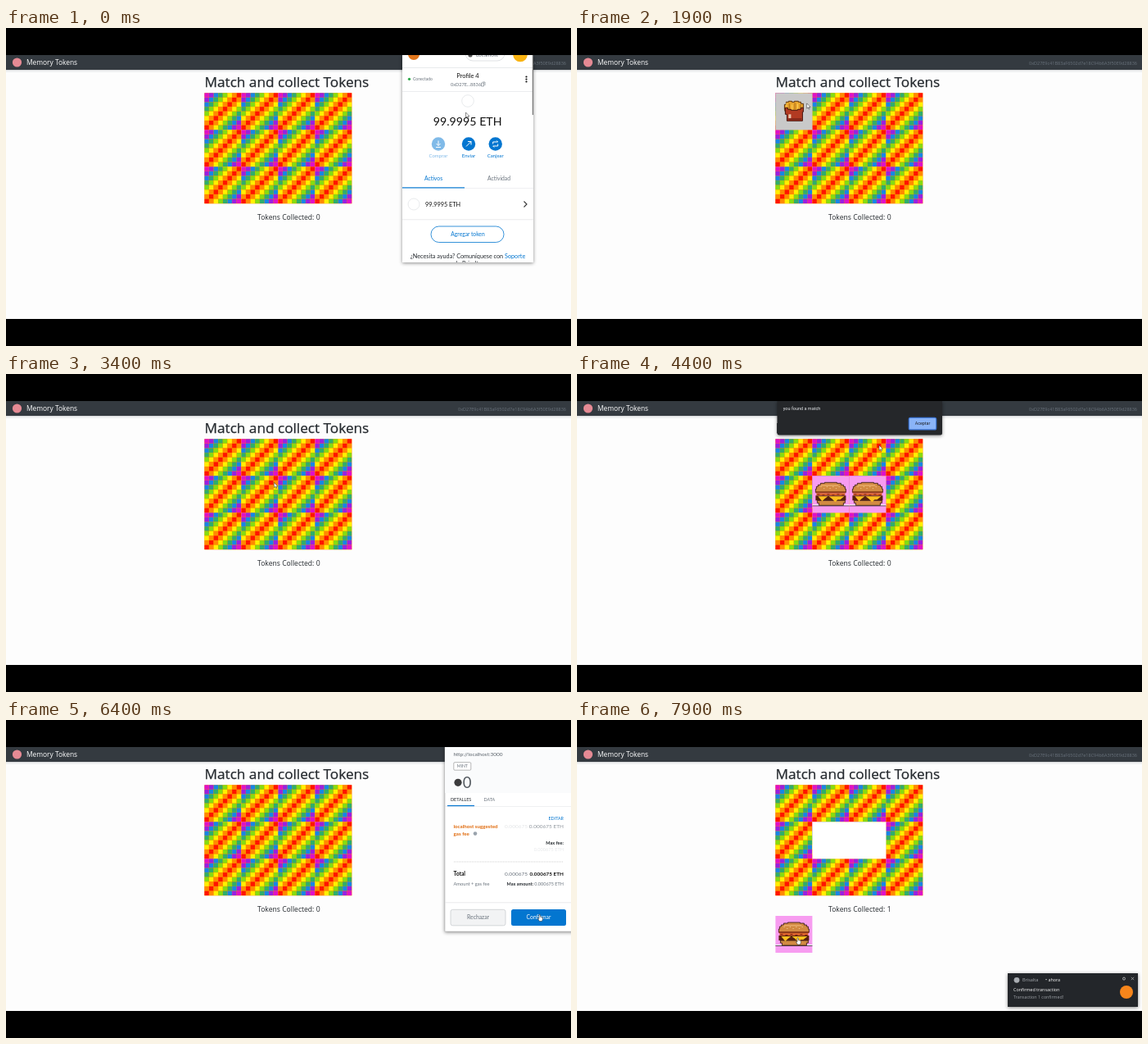
Animation of 690 by 388 pixels, one loop 8 s. Source, as an HTML page:

```html
<!DOCTYPE html>
<html lang="en">
<head>
<meta charset="utf-8">
<title>Memory Tokens</title>
<style>
html, body { margin: 0; width: 100%; height: 100%; overflow: hidden; background: #000; }
svg { display: block; }
#stage { width: 100vw; height: 100vh; }
text { font-family: "Open Sans", "Noto Sans", sans-serif; white-space: pre; }
.wallet text { font-family: Lato, "Open Sans", sans-serif; }
.dark text { font-family: Roboto, "Open Sans", sans-serif; }
.shadow { filter: drop-shadow(0 1px 2px rgba(0, 0, 0, .45)); }
</style>
</head>
<body>
<svg id="stage" viewBox="0 0 690 388"></svg>
<script>
const LOOP = 8000, STEP = 100;
const BLUE = '#0376d0', INK = '#24292e', GREY = '#6a737d', PALE = '#dfe1e4', ORANGE = '#f6851b';
const SIZE = 45, LEFT = 242.4, TOP = 79.3;

const text = (x, y, size, fill, str, { w = 400, a = 'start' } = {}) =>
  `<text x="${x}" y="${y}" font-size="${size}" fill="${fill}" font-weight="${w}" text-anchor="${a}">${str}</text>`;
const rect = (x, y, w, h, fill, more = '') =>
  `<rect x="${x}" y="${y}" width="${w}" height="${h}" fill="${fill}" ${more}/>`;
const circle = (x, y, r, fill, more = '') => `<circle cx="${x}" cy="${y}" r="${r}" fill="${fill}" ${more}/>`;
const path = (d, fill, stroke = 'none', width = 1, more = '') =>
  `<path d="${d}" fill="${fill}" stroke="${stroke}" stroke-width="${width}" ${more}/>`;
const group = (id, body, cls = '') => `<g id="${id}" class="${cls}">${body}</g>`;
const mid = { a: 'middle' }, end = { a: 'end' }, bold = { w: 700 }, endBold = { a: 'end', w: 700 };

// Card back: diagonal bands, mirrored about the red centre line
const bands = ['#e010c8', '#9a20e0', '#1686e6', '#2fae6a', '#86dc10', '#fff000', '#ff8a00', '#ff1400'];
function cardBack() {
  const cell = SIZE / 8;
  let out = rect(0, 0, SIZE, SIZE, '#f80');
  for (let i = 0; i < 64; i++) {
    const x = i % 8, y = i >> 3;
    out += rect(x * cell, y * cell, cell - .25, cell - .25, bands[7 - Math.abs(7 - x - y)]);
  }
  return out;
}

function fries() {
  let out = rect(0, 0, SIZE, SIZE, '#c9c9c9') +
    path('M11 20V14h2v-3h3v-1h4v1h3v-1h5v1h3v2h3v6h-2v4H12z', '#e9a52b', '#5a3212');
  for (let i = 0; i < 6; i++) out += rect(13 + i * 3.4, 12 + i % 3, 1, 8, i % 2 ? '#a9691b' : '#ffd35a');
  return out + path('M12 18h3v2h4v1h8v-1h4v-2h3v5h-1v11H14v-8h-2z', '#b23a22', '#45160f') +
    rect(16, 26, 3, 5, '#e8c9b0') + rect(15, 31, 17, 2, '#7c2418');
}

function popsicle() {
  return rect(0, 0, SIZE, SIZE, '#62f2ec') +
    path('M20 30h5v6h-1v1h-3v-1h-1z', '#c97a3a', '#2a1a18') +
    path('M15 30V13h1v-2h2v-2h9v2h2v2h1v17h-2v1H17v-1z', '#b9ecfb', '#101820', 1.2) +
    rect(18, 12, 2, 10, '#fff') + rect(26, 14, 2, 14, '#84cde8');
}

function burger() {
  let out = rect(0, 0, SIZE, SIZE, '#f79cf0') + rect(0, 35, SIZE, 1.5, '#fff') +
    rect(0, 36.2, SIZE, .8, '#3a2a3a') +
    path('M6 30h34v3h-2v3H8v-3H6z', '#d28a42', '#2a1410', .8) +
    path('M4 20V16h1v-3h2v-2h3V9h5V8h15v1h5v2h3v2h2v3h1v4z', '#d28a42', '#2a1410', .8) +
    rect(10, 11, 22, 1.5, '#e8ac68') +
    rect(4, 19, 37, 2, '#8e3c1c') + rect(5, 21, 35, 3, '#d9622c') + rect(4, 24, 37, 6, '#55210f');
  for (let i = 0; i < 7; i++) out += rect(10 + i * 3.7, 13 + i * 2 % 4, 1.2, .8, '#f6d9a0');
  for (let i = 0; i < 6; i++) out += rect(6 + i * 6, 22 + i % 2, 3, 1, '#7b2114');
  return out + path('M7 25h12l-4 3 -3 3zM20 25h19l-5 4h-3l-3 3 -4-4z', '#fcbf1e');
}

const faces = { back: cardBack, fries, popsicle, burger };
const at = (face, col, row) => `<use href="#${face}" x="${LEFT + col * SIZE}" y="${TOP + row * SIZE}"/>`;

function page() {
  let out = rect(0, 33, 690, 322, '#fdfdfd') + rect(0, 51, 690, 1, '#d6d8da') + rect(0, 52, 690, 2, '#f1f2f3') +
    rect(0, 33, 690, 18, '#343a40') + circle(13.5, 42, 5.6, '#e58a94') +
    text(25, 45, 8.4, '#fff', 'Memory Tokens') +
    text(684, 44.5, 5.5, '#69727b', '0xD27E9c41B83aF6502d7e18C94b6A3f50E9d28836', end) +
    `<g stroke="${INK}" stroke-width=".25">${text(242.5, 72, 17.2, INK, 'Match and collect Tokens', { w: 500 })}</g>`;
  for (let i = 0; i < 12; i++) out += at('back', i % 4, i >> 2);
  return out + group('none', text(345.3, 233.6, 8.6, INK, 'Tokens Collected: 0', { w: 500, ...mid })) +
    group('one', text(345.3, 233.6, 8.6, INK, 'Tokens Collected: 1', { w: 500, ...mid }) +
      rect(LEFT + SIZE, TOP + SIZE, SIZE * 2, SIZE, '#fff') +
      `<use href="#burger" x="${LEFT}" y="239"/>`);
}

function account() {
  const action = (x, label, fill, icon) => circle(x, 141.5, 8.2, fill) +
    path(icon, 'none', '#fff', 1, `transform="translate(${x} 141.5)"`) + text(x, 158, 6, fill, label, mid);
  const body = rect(484, 33, 160, 253, '#fff') +
    circle(498, 32, 7, '#e2761b') + circle(628, 32.5, 8.8, '#f9b312') +
    rect(561, 20, 48, 20, '#fff', `rx="9" stroke="${PALE}"`) + circle(567, 33, 2.6, '#555') +
    text(574, 35.3, 6.5, GREY, 'Localhost') +
    rect(484, 48, 160, .7, PALE) + circle(492.5, 62.3, 1.6, '#28a745') + text(497, 64.3, 5, GREY, 'Conectado') +
    text(564, 60.6, 7.5, '#111', 'Profile 4', mid) + text(561.5, 71.2, 5.6, GREY, '0xD27E...8836', mid) +
    path('M580.5 67h3v4h-3zM582 66h3v4', 'none', GREY, .6) +
    [59.5, 62.5, 65.5].map(y => circle(635.5, y, 1.1, '#111')).join('') +
    rect(484, 77, 160, .6, PALE) + circle(564, 89, 7.3, '#fff', `stroke="${PALE}" stroke-width=".7"`) +
    text(563.7, 118.5, 14.2, '#111', '99.9995 ETH', mid) +
    action(528, 'Comprar', '#80bae8', 'M0-4V2M-2.5-.5L0 2 2.5-.5M-3 4H3') +
    action(565, 'Enviar', BLUE, 'M-3 3L3-3M-1-3H3V1') +
    action(597.7, 'Canjear', BLUE, 'M-3 0V-2.5H3L1.5-4M3 0V2.5H-3L-1.5 4') +
    text(522, 186, 6.8, BLUE, 'Activos', mid) + text(602, 186, 6.8, GREY, 'Actividad', mid) +
    rect(560, 195, 84, .5, PALE) + rect(484, 194.3, 76, 1.2, BLUE) +
    circle(498, 215, 7, '#fff', `stroke="${PALE}" stroke-width=".7"`) +
    text(512, 217.5, 7.3, '#111', '99.9995 ETH') + path('M632.5 211.5l3.5 3.5 -3.5 3.5', 'none', '#333', 1.1) +
    rect(484, 233.5, 160, .7, PALE) +
    rect(519, 242, 89, 19.5, '#fff', `rx="9.7" stroke="${BLUE}" stroke-width=".8"`) +
    text(564, 254, 6.7, BLUE, 'Agregar token', mid) +
    text(564, 281, 7.25, INK, `¿Necesita ayuda? Comuníquese con <tspan fill="${BLUE}">Soporte</tspan>`, mid) +
    text(564, 290, 7.25, INK, 'de Brisalta', mid) + rect(642.8, 33, 1.2, 73, '#777');
  return rect(484, 33, 160, 253, '#fff', 'class="shadow"') +
    `<svg x="484" y="33" width="160" height="253" viewBox="484 33 160 253">${body}</svg>`;
}

function confirmation() {
  const fee = '0.000675', eth = fee + ' ETH';
  const loader = group('loader', circle(614, 104, 33, ORANGE) +
    group('spinner', path('M616.5 150.8A4.8 4.8 0 1 0 616.5 157.8', 'none', ORANGE, 1.4)));
  const details = group('details', rect(536, 33, 154, 56, '#fafbfc') +
    text(546.5, 44.2, 6.5, '#5b636b', 'http://localhost:3000') +
    rect(546.8, 51.7, 21, 9.5, '#fff', 'rx="1.2" stroke="#888" stroke-width=".6"') +
    text(557.3, 58.4, 5.2, GREY, 'MINT', mid) + circle(552, 76.3, 4.6, '#3c3c3d') +
    text(557.8, 83, 18.5, '#555b61', '0') +
    text(543, 99, 5.4, INK, 'DETALLES') + text(583.5, 99, 5.4, GREY, 'DATA') +
    rect(536, 105, 154, .5, PALE) + rect(539, 104, 33, 1.2, BLUE) +
    text(681, 121.6, 5.4, BLUE, 'EDITAR', end) +
    text(546.5, 132, 6.2, '#e06a0c', 'localhost suggested', bold) +
    text(546.5, 141, 6.2, '#e06a0c', 'gas fee', bold) + circle(573, 138.6, 2.3, '#9aa3ac') +
    text(637, 132, 6.5, '#e3e5e7', fee, end) + text(681, 132, 6.5, '#8f969d', eth, end) +
    text(681, 152, 5.6, INK, 'Max fee:', endBold) + text(681, 159.5, 5.6, '#e6e8ea', eth, end) +
    path('M547 173H681', 'none', '#bbb', .7, 'stroke-dasharray="1 1"') +
    text(546.5, 190.3, 6.7, '#111', 'Total', bold) + text(637, 190.3, 6.5, GREY, fee, end) +
    text(681, 190.3, 6.4, '#111', eth, endBold) +
    text(546.5, 202, 5.7, GREY, 'Amount + gas fee') +
    text(681, 202, 5.5, GREY, `<tspan font-weight="700" fill="${INK}">Max amount:</tspan> ${eth}`, end) +
    rect(536, 222.5, 154, .7, PALE) +
    rect(543, 231.3, 67, 19.5, '#f2f3f4', 'rx="2.5" stroke="#c9cdd1" stroke-width=".8"') +
    text(576.5, 243.3, 6.8, GREY, 'Rechazar', mid) +
    group('accept', rect(617, 231, 67, 20, BLUE, 'rx="2.5"') + text(650.5, 243.3, 6.8, '#fff', 'Confirmar', mid)));
  return `<svg x="526" y="33" width="164" height="235" viewBox="526 33 164 235">` +
    rect(536, 33, 160, 225, '#fff', 'class="shadow" stroke="#aaa" stroke-width=".5"') + loader + details + '</svg>';
}

const alertBox = (id, message) => group(id,
  path('M244.5 33H446V72q0 2.5-2.5 2.5H247q-2.5 0-2.5-2.5z', '#25272a', 'none', 0, 'class="shadow"') +
  text(251.8, 44.2, 5.5, '#e8eaed', message) +
  rect(405.3, 53.3, 33.4, 14.6, '#8ab4f8', 'rx="2" stroke="#3f78d8" stroke-width="1.2"') +
  text(422, 62.4, 5.4, '#202124', 'Aceptar', mid), 'dark');

const notice = () => rect(526, 309, 159, 41, '#23262a', 'class="shadow"') +
  circle(537, 317.3, 3.4, '#a9adb2') + text(544, 319.3, 5.5, '#a9adb2', 'Brisalta') +
  text(572, 319.3, 5.4, '#fff', '• ahora') +
  circle(668, 315.6, 1.5, 'none', 'stroke="#bbb" stroke-width=".9"') +
  path('M676.8 313.8l3.4 3.4M680.2 313.8l-3.4 3.4', 'none', '#bbb', .7) +
  text(533, 331, 5.4, '#fff', 'Confirmed transaction') + text(533, 340, 5.3, '#9a9ea3', 'Transaction 1 confirmed!') +
  circle(671, 332, 8, ORANGE);

const arrow = path('M0 0V6.2L1.5 4.9 2.5 7.2 3.5 6.7 2.5 4.6H4.5z', '#fff', '#222', .5);
const hand = path('M0 0q1-.8 1.4 .3V2.6l3 .8V6l-1 2H.4L-1.6 4.6 0 4.8z', '#fff', '#222', .5);

const stage = document.getElementById('stage');
stage.innerHTML = '<defs>' + Object.entries(faces).map(([id, draw]) => group(id, draw())).join('') + '</defs>' +
  page() + group('card1', at('fries', 0, 0)) + group('card2', at('popsicle', 1, 0)) +
  group('card3', at('burger', 1, 1)) + group('card4', at('burger', 2, 1)) +
  group('account', account(), 'wallet') + group('confirmation', confirmation(), 'wallet') +
  alertBox('miss', 'sorry, try again') + alertBox('match', 'you found a match') +
  group('notice', notice()) + group('cursor', group('arrow', arrow) + group('hand', hand));

// id: [shown from, hidden at]
const shown = {
  account: [0, 1700], card1: [1700, 3100], card2: [2300, 3100], miss: [2400, 3100],
  card3: [3600, 4800], card4: [4100, 4800], match: [4200, 4800],
  confirmation: [4900, 6800], loader: [4900, 5500], details: [5500, 6800],
  none: [0, 7100], one: [7100, LOOP], notice: [7600, LOOP],
  arrow: [0, 6200], hand: [6200, LOOP]
};
const route = [
  [0, 561.5, 103], [200, 545, 125], [900, 290, 130], [1200, 269, 90], [1700, 269, 90],
  [2200, 302, 95.5], [2600, 302, 95.5], [3000, 421, 59], [3100, 421, 59], [3500, 310, 146],
  [3700, 310, 146], [4000, 355, 146], [4200, 355, 146], [4400, 369, 87], [4700, 421, 59],
  [4900, 421, 59], [5600, 580, 190], [6200, 651, 237.5], [6800, 651, 237.5], [7800, 269, 266], [LOOP, 269, 266]
];
const $ = id => document.getElementById(id);

function position(t) {
  const i = route.findIndex(p => p[0] > t);
  const [t0, x0, y0] = route[i - 1], [t1, x1, y1] = route[i];
  const k = (t - t0) / (t1 - t0), e = k * k * (3 - 2 * k);
  return [x0 + (x1 - x0) * e, y0 + (y1 - y0) * e];
}

function draw(now) {
  const t = Math.floor(now % LOOP / STEP) * STEP;
  for (const [id, [from, to]] of Object.entries(shown)) $(id).style.display = t >= from && t < to ? '' : 'none';
  $('cursor').setAttribute('transform', `translate(${position(t)})`);
  $('spinner').setAttribute('transform', `rotate(${(t - 5000) * .36} 613 154.3)`);
  $('accept').setAttribute('opacity', t < 5800 ? .5 : 1);
}

const start = performance.now();
function tick() {
  draw(performance.now() - start);
  requestAnimationFrame(tick);
}
tick();
</script>
</body>
</html>
```
